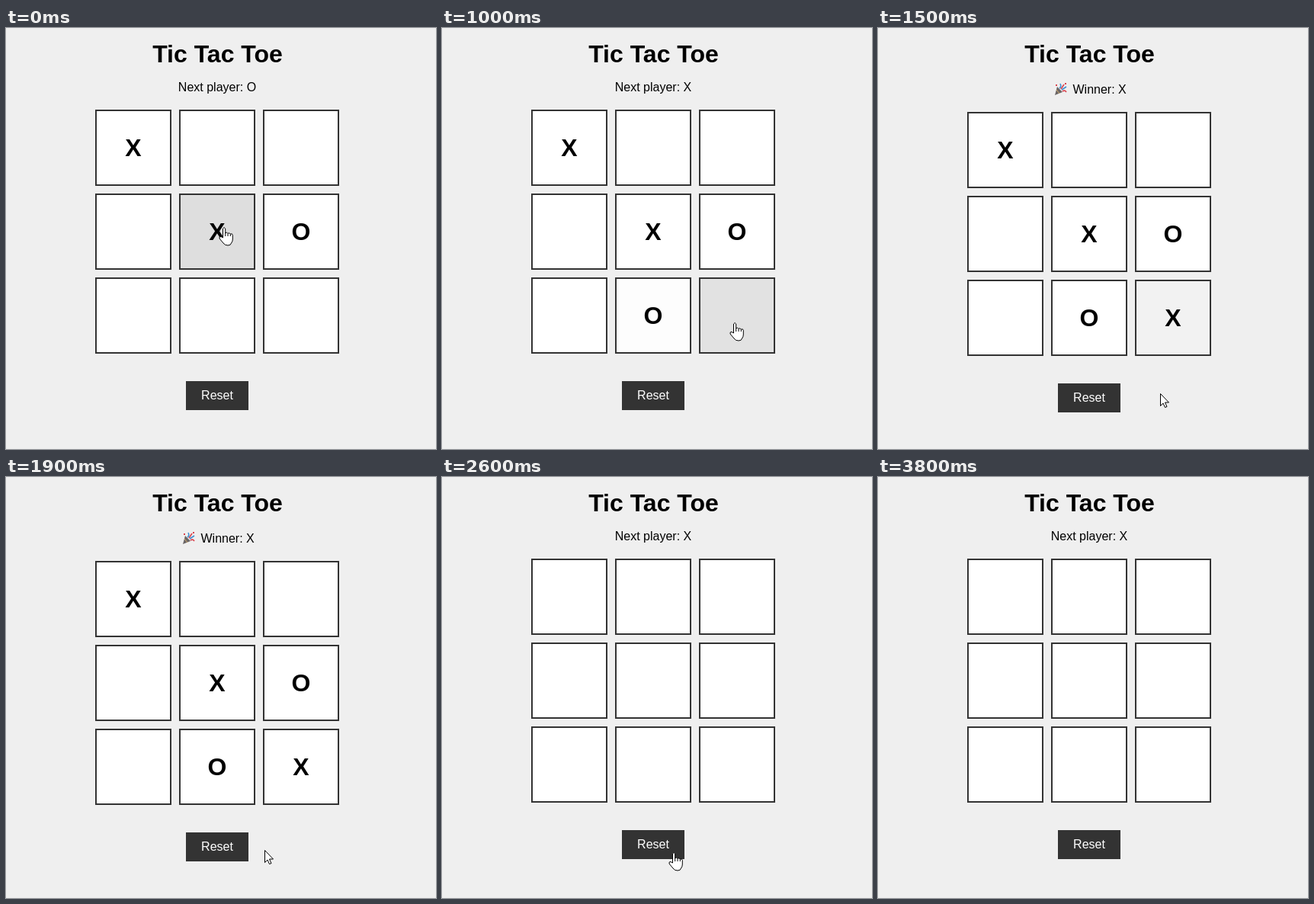
Recreate the animation shown at these times as an HTML page. Size 564x552 px, loop 3900 ms.

```html
<!DOCTYPE html>
<html lang="en">
<head>
<meta charset="utf-8">
<title>Tic Tac Toe</title>
<style>
  html, body { margin: 0; width: 100%; height: 100%; overflow: hidden; background: #efefef; }
  svg { display: block; font: 16px Arial, "Liberation Sans", sans-serif; text-anchor: middle; }
  .big { font-size: 32px; font-weight: bold; }
  .cell { stroke: #333; stroke-width: 2; }
  .pointer { fill: #fff; stroke: #000; stroke-linejoin: round; }
  .streamer { fill: none; stroke-width: 1.6; }
</style>
</head>
<body>
<svg width="564" height="552" viewBox="0 0 564 552">
  <text class="big" x="277.5" y="45">Tic Tac Toe</text>
  <text id="next" x="277" y="83"></text>
  <g id="winner">
    <path d="M235 77L242 84L232 88Z" fill="#6b6666"/>
    <path d="M234 81L238 86" stroke="#d8b070"/>
    <path class="streamer" d="M238 79Q241 77 239 73M241 81L247 77" stroke="#3f8fd2"/>
    <path class="streamer" d="M240 80L244 74M242 83Q245 81 247 84" stroke="#d9444f"/>
    <path d="M233 74h2v2h-2zM245 72h2v2h-2z" fill="#d9444f"/>
    <text x="255.5" y="86" style="text-anchor:start">Winner: X</text>
  </g>
  <g id="game">
    <g id="board"></g>
    <rect x="236" y="463" width="82" height="38" fill="#333"/>
    <text x="277" y="487" fill="#fff">Reset</text>
  </g>
  <g id="cursor" class="pointer">
    <path id="arrow" d="M.5.5V16.5L4 13L6.5 18.5L9 17.5L6.5 12H11.5Z"/>
    <g id="hand">
      <path d="M-1.5 14V2Q0-1 1.7 2V8Q3.5 5.5 5 8.500Q7 6.5 8.3 9.2Q10.8 7.8 11.3 10.5V16Q11.3 19 9.5 21Q9 24 5 24Q1 24-1 21L-6 15Q-6.5 12-4 12.5Z"/>
      <path d="M1.7 8V12M5 8.5V12M8.3 9.2V12" fill="none"/>
    </g>
  </g>
</svg>
<script>
const LOOP = 3900, STEP = 100, FADE = 300, WIN = 1100, RESET = 2500;
const $ = id => document.getElementById(id);

// Marks alternate, X first
const moves = [
  { cell: 0, at: 0 }, { cell: 5, at: 0 }, { cell: 4, at: 0 },
  { cell: 7, at: 800 }, { cell: 8, at: WIN }
];

// Pointer stops: time, x, y
const stops = [
  [0, 286, 261], [100, 286, 261],
  [500, 283, 371], [700, 283, 371],
  [930, 384, 386], [1300, 384, 386],
  [1500, 370, 479],
  [2200, 315, 497], [2300, 315, 497],
  [2500, 304, 492], [2600, 304, 492],
  [2700, 332, 430], [3000, 332, 150], [3400, 332, -30], [LOOP, 332, -30]
];

function pointerAt(t) {
  const i = stops.findIndex(stop => stop[0] > t);
  const [t0, x0, y0] = stops[i - 1], [t1, x1, y1] = stops[i];
  const k = (t - t0) / (t1 - t0);
  return [x0 + (x1 - x0) * k, y0 + (y1 - y0) * k];
}

// The winner line is taller and pushes the game down
const shiftAt = t => t >= WIN && t < RESET ? 3 : 0;

function hits(t, { x, y, w, h }) {
  const [px, py] = pointerAt(t), dy = py - shiftAt(t) - y;
  return px >= x && px < x + w && dy >= 0 && dy < h;
}

const resetButton = { x: 236, y: 463, w: 82, h: 38 };
const times = [...Array(LOOP).keys()];
const cells = Array.from({ length: 9 }, (_, i) => {
  const box = { x: 117 + i % 3 * 110, y: 107 + Math.floor(i / 3) * 110, w: 100, h: 100 };
  $("board").insertAdjacentHTML("beforeend",
    `<rect class="cell" x="${box.x + 1}" y="${box.y + 1}" width="98" height="98"/>
     <text class="big" x="${box.x + 50}" y="${box.y + 61}"></text>`);
  const [rect, label] = [...$("board").children].slice(-2);
  const hovered = times.filter(t => hits(t, box));
  const enter = hovered.length ? hovered[0] || -FADE : LOOP;
  const leave = hovered.length ? hovered.at(-1) : LOOP;
  return { ...box, rect, label, enter, leave };
});

// CSS "ease": cubic-bezier(.25, .1, .25, 1)
function ease(x) {
  if (x <= 0 || x >= 1) return x <= 0 ? 0 : 1;
  const curve = (a, b, s) => 3 * a * s * (1 - s) ** 2 + 3 * b * s * s * (1 - s) + s ** 3;
  let low = 0, high = 1;
  for (let i = 0; i < 20; i++) {
    const mid = (low + high) / 2;
    if (curve(.25, .25, mid) < x) low = mid; else high = mid;
  }
  return curve(.1, 1, low);
}

const show = (id, on) => $(id).setAttribute("visibility", on ? "visible" : "hidden");
const move = (id, x, y) => $(id).setAttribute("transform", `translate(${Math.round(x)} ${Math.round(y)})`);
const markOf = turn => turn % 2 ? "O" : "X";

function draw(t) {
  const played = t < RESET ? moves.filter(m => t >= m.at) : [];
  const won = played.length === moves.length;
  $("next").textContent = won ? "" : "Next player: " + markOf(played.length);
  show("winner", won);
  move("game", 0, shiftAt(t));

  cells.forEach(({ rect, label, enter, leave }, i) => {
    const turn = played.findIndex(m => m.cell === i);
    label.textContent = turn < 0 ? "" : markOf(turn);
    const shade = ease((t - enter) / FADE) - ease((t - leave) / FADE);
    const level = Math.round(255 - 33 * shade);
    rect.setAttribute("fill", `rgb(${level},${level},${level})`);
  });

  const overLink = [resetButton, ...cells].some(box => hits(t, box));
  move("cursor", ...pointerAt(t));
  show("hand", overLink);
  show("arrow", !overLink);
}

function tick() {
  const t = performance.now() % LOOP;
  draw(Math.floor(t / STEP) * STEP);
  requestAnimationFrame(tick);
}
tick();
</script>
</body>
</html>
```
